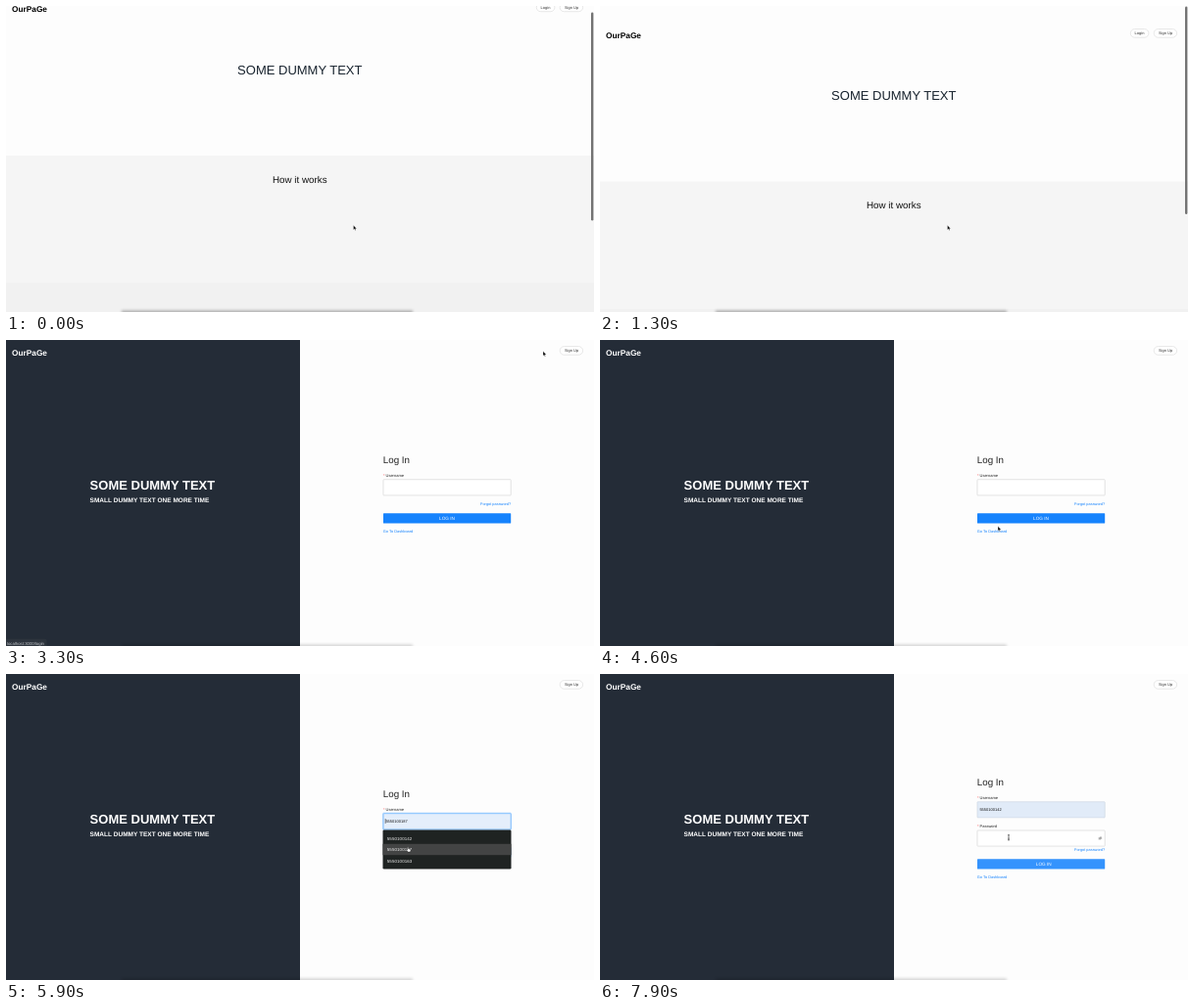
An HTML page that plays this animation: 600 by 313 pixels, repeating every 8000 ms.

```html
<!DOCTYPE html>
<html lang="en">
<head>
<meta charset="utf-8">
<title>Login flow</title>
<style>
  html, body { margin: 0; width: 100%; height: 100%; overflow: hidden; background: #fdfdfd; }
  svg { display: block; width: 100%; height: 100%; }
  text { font-family: "Liberation Sans", Arial, sans-serif; text-rendering: geometricPrecision; }
  .bold { font-weight: bold; }
  .mid { text-anchor: middle; }
  .tiny { font-size: 4px; }
  .link { font-size: 3.9px; fill: #1683fd; }
  .pill { fill: #fff; stroke: #d9d9d9; stroke-width: .6; }
  .box { fill: #fff; stroke: #d0d0d0; stroke-width: .6; }
  .option { font-size: 4.4px; letter-spacing: .12px; fill: #f2f2f2; }
</style>
</head>
<body>
<svg viewBox="0 0 600 313" preserveAspectRatio="none">
  <defs>
    <filter id="blur" x="-10%" y="-200%" width="120%" height="500%"><feGaussianBlur stdDeviation="1.8"/></filter>
    <g id="signup">
      <rect class="pill" x="565.2" y="6.6" width="23.4" height="8.6" rx="4.3"/>
      <text class="tiny mid" x="577" y="12.2" fill="#333">Sign Up</text>
    </g>
  </defs>

  <g id="home">
    <rect width="600" height="313" fill="#fdfdfd"/>
    <g id="page">
      <rect y="162.5" width="600" height="130" fill="#f5f5f5"/>
      <rect y="292.5" width="600" height="170" fill="#f1f1f1"/>
      <text class="bold" x="6" y="15.6" font-size="8.3">OurPaGe</text>
      <rect class="pill" x="541.3" y="6.6" width="18.6" height="8.6" rx="4.3"/>
      <text class="tiny mid" x="550.5" y="12.2" fill="#333">Login</text>
      <use href="#signup"/>
      <text class="mid" x="299.8" y="79.2" font-size="13" fill="#18232e">SOME DUMMY TEXT</text>
      <text class="mid" x="299.8" y="190" font-size="9.8" fill="#111">How it works</text>
    </g>
    <rect id="thumb" x="597" width="2.4" rx="1.2" fill="#747474"/>
  </g>

  <g id="login">
    <rect width="600" height="313" fill="#fdfdfd"/>
    <rect width="300" height="313" fill="#242c37"/>
    <g class="bold" fill="#fff">
      <text x="6" y="15.6" font-size="8.3">OurPaGe</text>
      <text x="85.6" y="152.6" font-size="13">SOME DUMMY TEXT</text>
      <text x="85.6" y="166" font-size="6.52">SMALL DUMMY TEXT ONE MORE TIME</text>
    </g>
    <use href="#signup"/>
    <g id="upper">
      <text x="384.8" y="125.5" font-size="9.8" fill="#222">Log In</text>
      <text class="tiny" x="385" y="139.6" fill="#ff4d4f">*</text>
      <text class="tiny" x="387.5" y="139.6" fill="#222">Username</text>
      <rect id="glow" x="384.4" y="142" width="131.2" height="17.6" rx="1" fill="none" stroke="#1683fd" stroke-opacity=".2" stroke-width="1"/>
      <rect id="field" class="box" x="385" y="142.7" width="130.2" height="16.2" rx=".6"/>
      <text id="value" class="tiny" x="387.4" y="152.3" fill="#111"></text>
      <path id="caret" d="M387.2 148v5" stroke="#111" stroke-width=".5"/>
    </g>
    <g id="password">
      <text class="tiny" x="385" y="156.9" fill="#ff4d4f">*</text>
      <text class="tiny" x="387.5" y="156.9" fill="#222">Password</text>
      <rect class="box" x="385" y="160" width="130.2" height="16.1" rx=".6"/>
      <g fill="none" stroke="#777" stroke-width=".45">
        <path d="M508.6 168q1.8-2.4 3.6 0q-1.8 2.4-3.6 0M509 169.7l2.8-3.4"/>
        <circle cx="510.4" cy="168" r=".6"/>
      </g>
    </g>
    <g id="lower">
      <text class="link" x="515.2" y="168.6" text-anchor="end">Forgot password?</text>
      <rect id="button" x="385" y="177.2" width="130.2" height="10.4" rx=".6" fill="#1683fd"/>
      <path id="spinner" d="M443 180.8a1.7 1.7 0 0 1 1.7 1.7" fill="none" stroke="#fff" stroke-width=".5"/>
      <text id="label" class="mid" x="450" y="184.1" font-size="4.7" fill="#fff">LOG IN</text>
      <text class="link" x="384.8" y="197.4">Go To Dashboard</text>
    </g>
    <g id="menu">
      <rect x="384.5" y="159.4" width="131" height="40.2" rx="1.4" fill="#1f2322"/>
      <rect id="hover" x="384.5" width="131" height="11.4" fill="#434444"/>
      <g id="options"></g>
    </g>
    <g id="status">
      <path d="M0 305.8h39.5q2 0 2 2V313H0z" fill="#2d343d"/>
      <text x="1" y="311.5" font-size="4.3" fill="#c3c6ca">localhost:3000/login</text>
    </g>
  </g>

  <rect id="dock" x="118" y="311.5" width="297" height="6" fill="#000" filter="url(#blur)"/>

  <g id="pointer" stroke-linejoin="round">
    <path id="arrow" d="M0 0V4.7L1.1 3.7L1.8 5.3L2.6 5L1.9 3.4H3.3Z" fill="#000" stroke="#fff" stroke-width=".35"/>
    <path id="hand" d="M-.4 0q.5-.5 1 0V1.8L2.6 2.3Q3.1 2.5 3 3.2L2.5 5H.1L-1.3 3.1Q-1.1 2.4-.4 2.9Z" fill="#fff" stroke="#111" stroke-width=".4"/>
    <path id="beam" d="M-1-2.8Q0-2.8 0-2V2Q0 2.8-1 2.8M1-2.8Q0-2.8 0-2M0 2Q0 2.8 1 2.8M-.6.9H.6" fill="none" stroke="#222" stroke-width=".6"/>
  </g>
</svg>

<script>
const LOOP = 8000, STEP = 100;
const $ = id => document.getElementById(id);
const set = (id, attrs) => { for (const k in attrs) $(id).setAttribute(k, attrs[k]); };
const show = (id, on) => set(id, { visibility: on ? "inherit" : "hidden" });
const move = (id, x, y) => set(id, { transform: `translate(${x} ${y})` });
const numbers = ["5550100142", "5550100187", "5550100163"];

// Eased value between [time, a, b, ...] keys
function track(keys, t) {
  let i = 0;
  while (i < keys.length - 2 && t >= keys[i + 1][0]) i++;
  const [a, b] = [keys[i], keys[i + 1]];
  const u = Math.min(1, Math.max(0, (t - a[0]) / (b[0] - a[0])));
  const e = u * u * (3 - 2 * u);
  return a.slice(1).map((v, n) => v + (b[n + 1] - v) * e);
}

const scrollKeys = [[0, 9.5], [500, -4], [1000, -18], [1300, -17], [1850, 0]];
const pointerKeys = [
  [0, 354.5, 224.3], [1500, 354.5, 224.3], [1800, 376, 204], [2200, 545.5, 16],
  [2400, 546, 12], [2800, 546, 12], [3300, 548, 11.5], [3500, 548, 11.5],
  [4400, 406, 190.5], [4700, 406, 190.5], [5100, 409, 152], [5300, 409, 152],
  [5700, 410, 177.5], [5900, 410, 177], [6100, 410, 167], [6600, 410, 167],
  [7000, 425, 181.5], [7400, 425, 190], [7550, 425, 190], [7900, 417, 167.3]
];

numbers.forEach((n, i) => {
  const row = document.createElementNS("http://www.w3.org/2000/svg", "text");
  row.setAttribute("class", "option");
  row.setAttribute("x", 388.8);
  row.setAttribute("y", 169.5 + i * 11.7);
  row.textContent = n;
  $("options").append(row);
});

function drawHome(t) {
  const [scroll] = track(scrollKeys, t);
  const over = Math.max(0, -scroll);
  move("page", 0, -scroll);
  set("thumb", {
    y: Math.max(.6, scroll * .68),
    height: 213 - over * .04,
    opacity: track([[1800, 1], [2200, 0]], t)[0]
  });
}

function drawLogin(t, y) {
  const open = t >= 5200 && t < 6300;
  const picked = t >= 6300;
  const focus = t >= 5100 && t < 7000;
  const full = t >= 7300;
  const loading = t >= 7000;
  const row = open && y > 160 ? (y < 173.5 ? 0 : 1) : -1;

  move("upper", 0, full ? -12 : 0);
  move("lower", 0, full ? 12 : 0);
  show("password", full);
  show("status", t < 3800);

  show("glow", focus);
  set("field", { style: focus
    ? "fill:" + (row >= 0 || picked ? "#e4eefb" : "#fff") + ";stroke:#40a0ff"
    : picked ? "fill:#e1ebf8;stroke:#c9d3df" : "" });
  $("value").textContent = picked ? numbers[0] : row >= 0 ? numbers[row] : "";
  show("caret", focus && !picked);

  show("menu", open);
  show("hover", row >= 0);
  set("hover", { y: 162.2 + Math.max(0, row) * 11.6 });

  set("button", { opacity: loading ? track([[7000, 1], [7200, .7], [7500, .7], [7900, .87]], t)[0] : 1 });
  set("label", { x: loading ? track([[7000, 450], [7200, 453.4], [7700, 453.4], [7900, 452.8]], t)[0] : 450 });
  show("spinner", loading && t < 7700);
  set("spinner", { transform: `rotate(${t * .36} 443 182.5)` });
}

function draw(ms) {
  const t = Math.floor((ms % LOOP) / STEP + .001) * STEP;
  const [x, y] = track(pointerKeys, t);
  const login = t >= 3000;
  show("home", !login);
  show("login", login);
  if (login) drawLogin(t, y); else drawHome(t);
  // The link address shows up just before the page changes
  if (t >= 2800 && !login) {
    show("login", false);
    $("status").setAttribute("visibility", "visible");
  }
  set("dock", { opacity: login ? .17 : .3 });

  const hand = (t >= 2200 && t < 3000) ? false : t >= 5400 && t < 6300;
  const beam = (t >= 5000 && t < 5400) || t >= 7800;
  move("pointer", x, y);
  show("hand", hand);
  show("beam", beam);
  show("arrow", !hand && !beam);
}

const start = performance.now();
function tick() {
  draw(performance.now() - start);
  requestAnimationFrame(tick);
}
tick();
</script>
</body>
</html>
```
